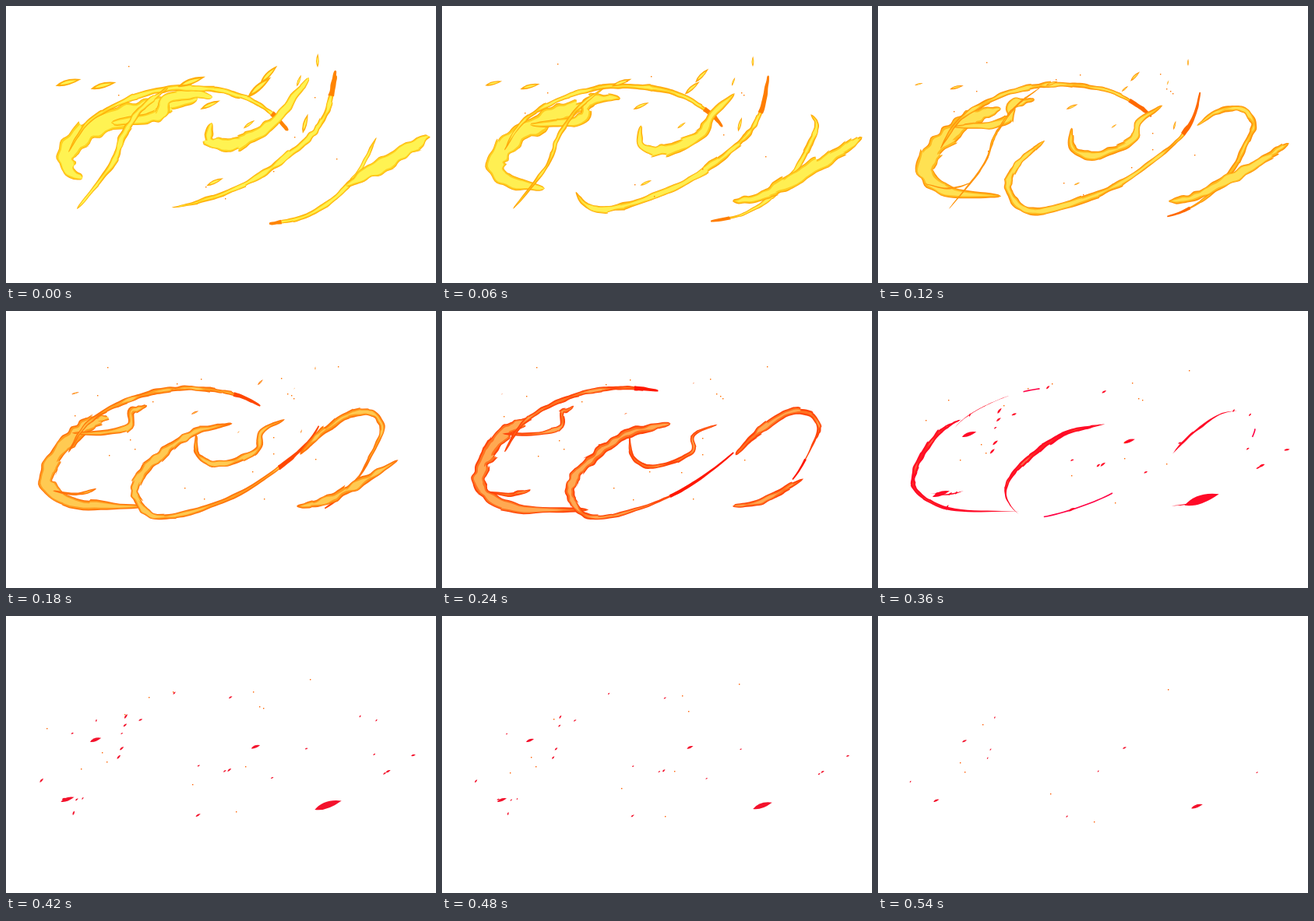
An HTML page with a canvas for the animation above (0.6 s loop, 552 by 356 pixels).

```html
<!DOCTYPE html>
<html lang="en">
<head>
<meta charset="utf-8">
<title>Flame swirl</title>
<style>
html, body { margin: 0; width: 552px; height: 356px; overflow: hidden; background: #fff; }
canvas { display: block; }
</style>
</head>
<body>
<canvas id="stage" width="552" height="356"></canvas>
<script>
const ctx = document.getElementById('stage').getContext('2d');
const STEP = 60, STEPS = 10, BURN = 5;

const mix = (a, b, t) => a + (b - a) * t;
const clamp = t => Math.max(0, Math.min(1, t));
const smooth = t => { t = clamp(t); return t * t * (3 - 2 * t); };
const hash = n => { const v = Math.sin(n * 127.1 + 31.7) * 43758.5453; return v - Math.floor(v); };
const noise = x => { const i = Math.floor(x); return mix(hash(i), hash(i + 1), smooth(x - i)); };

// path: key points; to: where they end up; w: half-width at start and end of the burn;
// grow: share lit at first; shed: share burnt off the front; swell: mass runs to the tail
const flames = [
  { // left body
    path: '246 119, 212 125, 180 132, 140 145, 105 162, 80 186, 79 209, 98 222',
    to: '108 139, 95 145, 80 155, 62 177, 47 205, 50 232, 95 255, 192 257',
    w: [15, 8]
  },
  { // tongue inside it
    path: '135 150, 180 145, 200 138, 206 120, 240 113, 265 117',
    to: '75 158, 115 159, 150 150, 152 131, 158 128, 165 122',
    w: [9, 2], ember: [.2, 15]
  },
  { // low tongue
    path: '60 220, 85 231, 110 230, 133 220',
    to: '60 233, 85 236, 100 234, 113 230',
    w: [-1, 4], ember: [.25, 18]
  },
  { // upper arc
    path: '362 160, 340 137, 300 115, 250 106, 200 108, 150 123, 105 150, 80 188',
    drift: [0, -7], w: [4, 3], shed: .55, tip: .14
  },
  { // slash
    path: '208 105, 175 131, 150 167, 135 205, 91 261',
    w: [4.5, -3]
  },
  { // middle sweep
    path: '423 83, 410 140, 375 182, 300 232, 210 259, 176 238, 178 208, 210 176, 250 150, 302 138',
    drift: [-9, 7], w: [4.3, 4], grow: .44, shed: .32, swell: 1, tip: .16
  },
  { // right loop
    path: '338 280, 382 271, 420 249, 450 217, 470 180, 479 155, 464 137, 436 139, 408 157, 388 174, 372 192',
    drift: [5, -7], w: [3.6, 2.6], grow: .44, shed: .44, swell: 1, tip: .1
  },
  { // right body
    path: '542 167, 515 184, 480 206, 440 229, 405 246, 373 251',
    w: [10, 3.5], grow: .62, pace: 1, shed: .75, ember: [.75, 36]
  },
  { // centre hook
    path: '264 150, 261 173, 285 178, 312 170, 340 153, 360 130, 389 92',
    to: '240 160, 243 186, 260 200, 290 197, 320 182, 322 160, 352 148',
    w: [9, 1.5], ember: [.77, 12]
  }
];
const parse = s => s.split(',').map(p => p.trim().split(' ').map(Number));
for (const f of flames) {
  const { drift: [dx, dy] = [0, 0] } = f;
  f.from = parse(f.path);
  f.end = f.to ? parse(f.to) : f.from.map(([x, y]) => [x + dx, y + dy]);
}

// Loose flecks at the start: x, y, length
const flecks = [
  [80, 98, 34], [125, 102, 34], [238, 97, 38], [337, 88, 32], [325, 104, 40],
  [262, 127, 28], [376, 96, 16], [400, 70, 18], [384, 151, 26], [312, 152, 18], [268, 226, 24]
];

// Yellow cools through orange to crimson
function colors(s) {
  const hue = Math.max(-7, 40 - 1.6 * s * s);
  const tone = (shift, light) => `hsl(${hue + shift} 100% ${light}%)`;
  if (s > 6) return Array(4).fill(`hsl(${hue} 90% 51%)`);
  return [tone(0, 52), tone(8, 56), tone(16, 66), tone(-9, 50)];
}

// Catmull-Rom point at u in 0..1
function at(pts, u) {
  const f = u * (pts.length - 1), i = Math.min(Math.floor(f), pts.length - 2), t = f - i;
  const g = k => pts[Math.max(0, Math.min(pts.length - 1, k))];
  const [a, b, c, d] = [g(i - 1), g(i), g(i + 1), g(i + 2)];
  return b.map((v, k) => v + t / 2 * (c[k] - a[k] +
    t * (2 * a[k] - 5 * v + 4 * c[k] - d[k] + t * (3 * (v - c[k]) + d[k] - a[k]))));
}

function spineOf(f, s, seed) {
  const { grow = 1, pace = 3.3, shed = 0, swell = 0, w } = f;
  const k = clamp(s / BURN), ease = 1 - (1 - k) ** 2;
  const pts = f.from.map((p, i) => p.map((v, j) => mix(v, f.end[i][j], ease)));
  const head = shed * k * k, tail = mix(grow, 1, smooth(s / pace));
  const spot = v => at(pts, mix(head, tail, clamp(v)));

  let len = 0;
  for (let i = 0; i < 20; i++) {
    const [x, y] = spot(i / 20), [x2, y2] = spot((i + 1) / 20);
    len += Math.hypot(x2 - x, y2 - y);
  }
  const n = Math.max(8, Math.round(len / 3));
  return Array.from({ length: n + 1 }, (_, i) => {
    const v = i / n, [x, y] = spot(v), p = spot(v - .01), q = spot(v + .01);
    const a = Math.atan2(q[1] - p[1], q[0] - p[0]);
    let r = mix(...w, k) * Math.sin(Math.PI * v) ** .5 * (1 + swell * k * (3 * v - 1));
    if (s > BURN) r = r * .6 - 1.5;
    r = Math.max(0, r);
    const side = d => {
      const m = seed + d * 91 + i * .32;
      const lick = hash(Math.floor(m * 2)) > .9 ? 1 : 0;
      return { r: r * (.68 + .55 * noise(m) + .2 * lick), back: lick * Math.min(6, r) };
    };
    return { x, y, v, c: Math.cos(a), s: Math.sin(a), sides: [side(0), side(1)], heat: noise(seed + i * .21) };
  });
}

function fillSpine(spine, color, inset) {
  const edge = (p, j) => {
    const { r, back } = p.sides[j], d = Math.max(0, inset(r, p.heat)) * (j ? -1 : 1);
    ctx.lineTo(p.x - p.s * d - p.c * back, p.y + p.c * d - p.s * back);
  };
  ctx.beginPath();
  spine.forEach(p => edge(p, 0));
  [...spine].reverse().forEach(p => edge(p, 1));
  ctx.fillStyle = color;
  ctx.fill();
}

function leaf(x, y, len, w, angle, color) {
  ctx.save();
  ctx.translate(x, y);
  ctx.rotate(angle);
  ctx.beginPath();
  ctx.moveTo(-len / 2, w * .3);
  ctx.quadraticCurveTo(-len * .1, -w, len / 2, -w * .2);
  ctx.quadraticCurveTo(-len * .1, w * .9, -len / 2, w * .3);
  ctx.fillStyle = color;
  ctx.fill();
  ctx.restore();
}

function drawFlames(s, [rim, mid, core, tip]) {
  const band = 1 + s * .2;
  flames.forEach((f, i) => {
    const spine = spineOf(f, s, i * 37 + s * 11);
    fillSpine(spine, rim, r => r);
    fillSpine(spine, mid, (r, heat) => r - band * (.4 + heat));
    fillSpine(spine, core, (r, heat) => r * .85 - band * (.6 + 1.8 * heat));
    if (f.tip) fillSpine(spine.filter(p => p.v < f.tip), tip, r => r + .8);
  });
}

function drawFlecks(s, [rim, , core]) {
  flecks.forEach(([x, y, len], i) => {
    const k = 1 - s / (2.5 + 3 * hash(i + 4));
    if (k <= 0) return;
    const px = x + (x / 25 - 17) * s, py = y + 1.2 * s;
    const angle = -.15 - (x / 380) ** 5, w = len * .22 * k;
    leaf(px, py, len * k, w, angle, rim);
    leaf(px, py, len * k * .65, w * .5, angle, core);
  });
}

// What is left of each flame breaks into shrinking shards
function drawEmbers(s, [rim]) {
  const k = (10.5 - s) / 3.5;
  const shard = (f, u, len, angle) => {
    const [x, y] = at(f.end, u);
    if (len * k > 2.5) leaf(x - 2 * (s - 7), y + .8 * (s - 7), len * k, len * k * .22 + 1, angle, rim);
  };
  flames.forEach((f, i) => {
    if (f.ember) shard(f, ...f.ember, -.2);
    for (let j = 0; j < 3; j++) {
      const h = hash(i * 9 + j);
      shard(f, .15 + .7 * h, 3 + 4 * hash(h * 50), -h);
    }
  });
}

function drawSparks(s) {
  ctx.fillStyle = `hsl(${30 - s} 100% 50%)`;
  for (let i = 0; i < 22; i++) {
    const x = mix(110, 500, hash(i + .3)), y = mix(60, 260, hash(i + 60.7));
    const born = 6 * hash(i + 20) - 2;
    if (s >= born && s < born + 7)
      ctx.fillRect(Math.round(x - 9 * s), Math.round(y + .64 * (s - 3) ** 2), 1.4, 1.4);
  }
}

function draw(s) {
  const tones = colors(s);
  ctx.clearRect(0, 0, 552, 356);
  if (s <= BURN + 1) drawFlames(s, tones);
  drawFlecks(s, tones);
  if (s > BURN) drawEmbers(s, tones);
  drawSparks(s);
}

let shown = -1;
function tick() {
  const s = Math.floor(performance.now() / STEP) % STEPS;
  if (s !== shown) draw(shown = s);
  requestAnimationFrame(tick);
}
tick();
</script>
</body>
</html>
```
